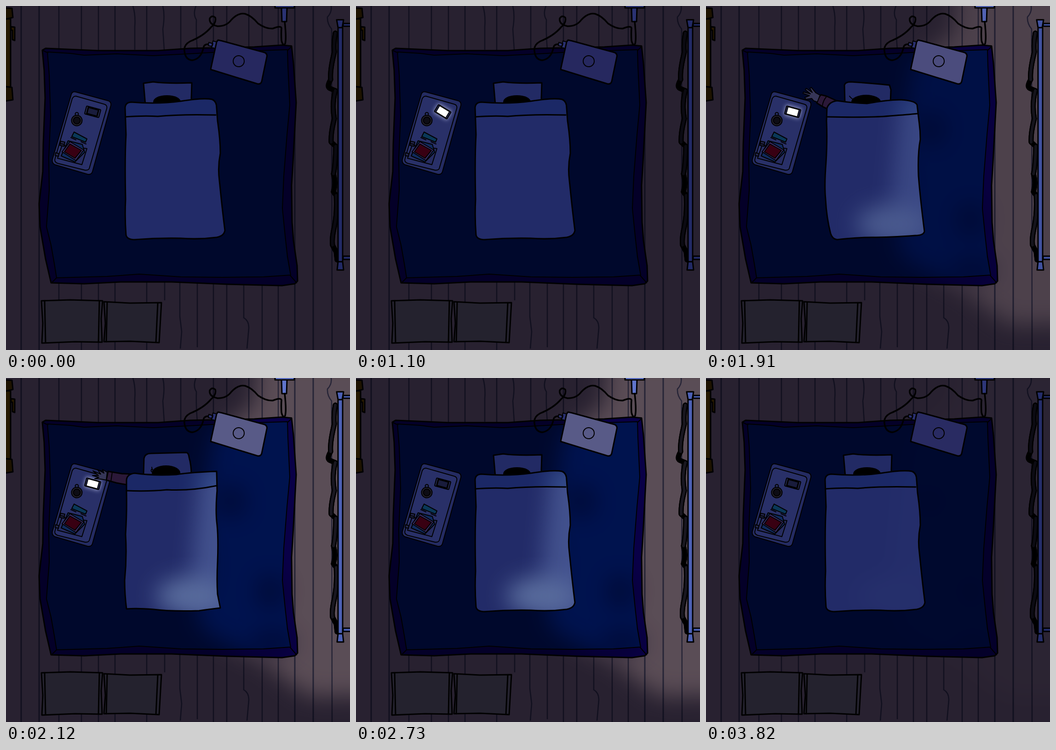
Animation of 748 by 748 pixels, one loop 3850 ms. Source, as an HTML page:

```html
<!DOCTYPE html>
<html>
<head>
<meta charset="utf-8">
<style>
html, body { margin: 0; width: 100%; height: 100%; overflow: hidden; background: #282130; }
svg { display: block; width: 100vw; height: 100vh; isolation: isolate; }
.ink { stroke: #000; stroke-width: 3; stroke-linejoin: round; stroke-linecap: round; }
.thin { stroke-width: 2; }
.line { fill: none; }
.light { mix-blend-mode: color-dodge; }
</style>
</head>
<body>
<svg viewBox="0 0 748 748">
  <defs>
    <filter id="soft" x="-50%" y="-50%" width="200%" height="200%"><feGaussianBlur stdDeviation="24"/></filter>
    <filter id="halo" x="-50%" y="-50%" width="200%" height="200%"><feGaussianBlur stdDeviation="4"/></filter>
    <clipPath id="bedClip"><path class="cover"/></clipPath>
  </defs>

  <rect width="748" height="748" fill="#282130"/>
  <g id="planks" class="line" stroke="#11101f" stroke-width="2.5">
    <path d="M276 0Q282 20 280 45V95M341 0Q346 20 341 50L344 95M413 0Q406 18 414 30Q413 60 416 95"/>
    <path d="M378 600V675L382 708L379 745M517 603V678Q528 684 528 700L524 745"/>
    <path d="M707 0Q709 14 699 24Q698 38 708 50L709 748"/>
  </g>

  <!-- cabinet -->
  <g class="ink" fill="#261900">
    <path d="M-3 28H10V176H-3z"/>
    <path d="M-3 4L13 5L15 25L-3 29zM-3 175L13 177L15 204L-3 207z" fill="#1d1300"/>
    <path d="M11 45L19 46V75L14 73V53L11 52z"/>
  </g>

  <!-- boxes -->
  <g class="ink" fill="#24222e" stroke-width="2.5">
    <path d="M77 641L140 639L210 641L207 680L209 731L150 730L78 733L80 690zM213 643L270 646L338 645L333 732L270 729L213 730L216 690z"/>
    <path class="line" d="M84 641L86 732M203 641L201 731M220 644L218 730M330 646L326 731"/>
  </g>

  <!-- rug -->
  <g class="ink" stroke-width="2.5">
    <path fill="#040028" d="M79 96L86 92L200 97L330 97L400 92L540 89L600 85L621 87L625 125L631 210L624 340L621 390L622 470L625 510L633 565L634 598L628 604L600 608L480 605L360 600L250 600L170 604L98 602L86 550L74 480L72 430L80 360L81 300L85 200L83 140z"/>
    <path class="thin" fill="#00082c" d="M90 100L140 103L170 107L240 104L320 108L415 103L480 99L612 95L613 130L617 215L611 280L604 370L601 440L607 500L612 545L619 585L560 589L470 590L380 589L290 583L220 588L110 591L105 560L98 520L88 480L94 400L93 330L97 240L94 150z"/>
    <path class="line thin" d="M81 97L91 102M613 96L621 88M618 586L632 602M110 591L99 602"/>
  </g>

  <!-- curtain and rail -->
  <g class="line" stroke-linejoin="round" stroke-linecap="round">
    <path id="drape" stroke="#000" stroke-width="11" d="M716 59Q712 80 714 100Q704 140 706 160Q697 175 704 179L716 184Q708 215 714 245Q706 275 707 296L717 305Q716 350 712 365Q718 385 712 404L718 412Q720 450 714 480Q708 505 710 520L718 535L720 552"/>
    <use href="#drape" style="stroke-width:6"/>
    <path stroke="#0b0a12" stroke-width="6" d="M716 59Q712 80 714 100Q704 140 706 160M716 184Q708 215 714 245Q706 275 707 296M717 305Q716 350 712 365M718 412Q720 450 714 480Q708 505 710 520"/>
  </g>
  <g class="ink" fill="#222a66">
    <path d="M733 38H752V44H733zM733 544H752V551H733zM722 47H732V556H722zM719 30H734L731 47H722zM722 556H732L734 574H720z"/>
  </g>

  <!-- adapter -->
  <g class="ink" stroke-width="2.5" fill="#2a3272"><path d="M585 -2H627V4H585zM599 4H611L610 34H600z"/></g>

  <g class="light">
    <path filter="url(#soft)" fill="#8e9170" d="M550 -50L820 -50V690L660 692Q610 660 570 622L470 570Q380 540 440 430L425 290L450 125L540 60z"/>
    <g filter="url(#soft)" opacity=".5"><ellipse cx="488" cy="268" rx="30" ry="32"/><ellipse cx="575" cy="465" rx="26" ry="34"/><ellipse cx="580" cy="575" rx="45" ry="22"/></g>
  </g>

  <!-- laptop -->
  <g class="ink">
    <path class="line" stroke-width="3.5" d="M441 83Q430 82 429 92Q424 115 405 118Q390 117 388 98Q386 85 400 77Q430 65 446 46Q458 36 455 25Q448 19 443 27Q441 40 460 44Q480 44 490 30Q505 14 520 17Q535 22 548 38Q565 50 580 49Q598 42 599 48Q598 60 599 75Q602 88 607 82Q610 70 606 34"/>
    <path class="thin" fill="#2a3070" d="M441 79L450 82L448 88L440 86zM450 76L461 79L457 93L447 90z"/>
    <path id="lid" fill="#26285f" d="M461 74L470 76L562 101Q569 104 567 111L556 164Q554 171 546 169L445 138L458 78z"/>
    <circle class="thin" cx="506" cy="120" r="12" fill="#26285f"/>
  </g>

  <!-- side table -->
  <g class="ink thin">
    <path fill="#242b62" d="M142 192Q144 185 152 187L222 206Q229 208 228 216L188 360Q186 367 178 366L106 345Q99 341 101 333z"/>
    <path fill="#293068" d="M152 196L212 213Q221 215 219 223L182 350Q181 358 172 357L112 342Q104 339 107 331L143 205Q145 196 152 196z"/>
    <circle cx="154" cy="235" r="3.5" fill="#293068"/>
    <circle cx="154" cy="249" r="11.5" fill="#24222e"/>
    <circle cx="154" cy="249" r="7.5" fill="#0d0c14"/>
    <path fill="#0a3858" d="M148 274L176 289L173 296L143 284z"/>
    <path class="line" d="M141 286L152 291M163 295L174 300"/>
    <path fill="#262c60" d="M122 303L176 310L165 345L112 331z"/>
    <path fill="#102a5c" d="M135 293L166 301L171 318L150 339L120 326z"/>
    <path fill="#3a2d66" d="M139 295L169 313L152 336L122 317z"/>
    <path fill="#380012" d="M139 300L164 314L150 331L127 317z"/>
    <path fill="#24264c" d="M119 294L128 296L126 305L117 303zM108 319L115 321L114 327L107 325z"/>
    <path class="line" d="M117 299L127 301"/>
  </g>
  <g id="phone">
    <rect id="glow" x="-18" y="-12" width="36" height="24" rx="4" fill="#b9bfe8" filter="url(#halo)"/>
    <rect class="ink thin" x="-16" y="-9" width="32" height="18" rx="2" fill="#24284e"/>
    <rect class="ink" stroke-width="1" x="-11.5" y="-7" width="23" height="14" fill="#191c3c"/>
    <rect id="screen" x="-11.5" y="-7" width="23" height="14" fill="#fff"/>
  </g>

  <!-- bed -->
  <path id="pillow" class="ink" fill="#222a64"/>
  <path id="mark" class="ink thin line"/>
  <ellipse id="head"/>
  <g id="arm" class="ink" stroke-width="2.5">
    <path id="sleeve" fill="#2b1838"/>
    <path id="cuff" class="line thin"/>
    <path id="hand" class="thin" fill="#363658"/>
  </g>
  <path class="cover" fill="#222b68"/>
  <path id="band" clip-path="url(#bedClip)" fill="#1b2866"/>
  <path id="fold" class="ink line"/>
  <path class="cover ink line" stroke-width="3.5"/>

  <g class="light">
    <path fill="#959150" d="M461 74L470 76L562 101Q569 104 567 111L556 164Q554 171 546 169L445 138L458 78z" opacity=".95"/>
    <g clip-path="url(#bedClip)">
      <path filter="url(#soft)" fill="#8a8650" opacity=".8" d="M425 190H520V530H400L405 400z"/>
      <ellipse filter="url(#soft)" fill="#9c9855" cx="405" cy="474" rx="78" ry="42"/>
    </g>
  </g>
</svg>
<script>
const $ = id => document.getElementById(id);
const all = s => document.querySelectorAll(s);

const plank = x => `M${x} 0V748`;
$('planks').insertAdjacentHTML('afterbegin',
  `<path d="${[33, 72, 628, 668].map(plank).join('')}" stroke-width="3"/>` +
  `<path d="${[115, 164, 201, 237, 306, 451, 480, 557, 592].map(plank).join('')}M528 0V95M380 0V95M416 600V742M345 600V640"/>`);

const rest = {
  pillow: 'M299 168L320 165Q350 169 404 167L403 200L405 215H303z',
  head: [350, 208, 30, 14],
  cover: 'M259 222Q259 210 272 209Q330 214 380 207Q430 199 448 203Q458 207 458 222L460 250Q466 290 466 320Q460 350 464 380Q470 440 476 488Q474 500 458 503Q420 508 380 505Q330 504 280 508Q263 508 261 498Q258 460 260 420Q258 330 261 280z',
  fold: 'M260 241Q300 238 330 240Q380 235 456 237'
};
const reach = {
  pillow: 'M301 172Q303 165 315 165Q360 168 399 172L402 182L401 212H302z',
  mark: 'M312 196Q318 204 324 203',
  head: [348, 208, 32, 15],
  cover: 'M263 222Q268 208 285 206Q320 211 350 212Q400 203 425 204Q455 206 459 215L463 250Q466 270 466 290Q460 320 462 370Q466 420 475 490Q473 499 455 499Q400 503 360 503Q330 503 285 508Q275 507 271 495Q262 460 260 420Q257 390 261 340Q264 290 262 250z',
  fold: 'M263 241Q360 243 400 239Q440 236 460 234',
  sleeve: 'M237 205Q240 192 246 187L258 190L300 209L290 232L250 213z',
  cuff: 'M258 191Q250 200 249 212',
  hand: 'M244 188L235 183L225 171L222 173L227 182L214 173L212 176L223 185L208 181L207 184L221 189L211 193L213 197L226 195L230 200L238 203z'
};
const press = {
  pillow: 'M300 175Q302 164 315 164L392 162Q397 163 398 172Q403 190 403 210H299z',
  mark: 'M317 194Q318 202 323 203M317 198Q314 202 317 204',
  head: [348, 206, 31, 16],
  cover: 'M262 222Q263 209 280 207Q320 213 370 210Q400 205 458 203L459 245Q455 290 459 320Q462 350 460 400Q458 440 460 470L466 500Q440 503 420 506Q360 508 320 503Q285 500 262 502Q258 470 258 440Q263 390 260 340Q263 290 262 250z',
  fold: 'M262 245Q310 247 350 243Q400 246 459 234',
  sleeve: 'M222 203L252 208L340 212V240L262 232L240 228L218 222z',
  cuff: 'M231 205L228 225',
  hand: 'M220 205L210 199L213 207L199 199L206 209L189 202L201 212L188 212L202 216L193 219L207 220L218 222z'
};
const retreat = {
  pillow: 'M299 172Q300 165 312 165L390 163Q397 165 397 178L400 208H298z',
  mark: 'M318 192Q318 200 322 202',
  head: [346, 203, 30, 15],
  cover: 'M263 225Q265 210 280 209Q320 210 350 206Q400 208 455 202L458 245Q452 270 457 300Q463 340 462 400L460 460L462 505Q430 511 370 513Q320 514 290 507L259 495Q255 470 257 440Q263 360 263 300z',
  fold: 'M265 246Q320 245 370 251Q390 254 459 244',
  sleeve: 'M241 213L285 208V238L246 238z',
  cuff: 'M252 212L257 238',
  hand: 'M243 213L234 214L230 221L220 223L221 227L230 228L226 233L235 233L245 237z'
};

// start time, pose, arm offset
const poses = [
  [0, rest], [1520, reach, 90, 30], [1580, reach, 32, 14], [1640, reach],
  [1910, reach, 4, 6], [1970, press, 14], [2060, press],
  [2190, press, -16], [2240, press, -32], [2300, press, -42], [2350, press, -49],
  [2440, press, -20], [2470, retreat], [2600, reach, 90, 30], [2730, rest]
];

const tick = (t, start) => Math.floor((t - start) / 30) + 1;

function daylight(t) {
  if (t < 1370) return 0;
  return t < 3430 ? Math.min(1, tick(t, 1370) / 26) : Math.max(0, 1 - tick(t, 3430) / 15);
}

function tilt(t) {
  for (const start of [420, 960]) {
    const k = Math.floor((t - start) / 70);
    if (k >= 0 && k < 3) return k % 2 ? -8 : 16;
  }
  return 0;
}

let shown;
function setPose(entry) {
  if (entry === shown) return;
  shown = entry;
  const [, p, dx = 0, dy = 0] = entry;
  for (const id of ['pillow', 'mark', 'fold', 'sleeve', 'cuff', 'hand']) $(id).setAttribute('d', p[id] || '');
  for (const el of all('.cover')) el.setAttribute('d', p.cover);
  $('band').setAttribute('d', p.fold + 'L490 237V180H240V243z');
  ['cx', 'cy', 'rx', 'ry'].forEach((a, i) => $('head').setAttribute(a, p.head[i]));
  $('arm').setAttribute('transform', `translate(${dx} ${dy})`);
}

function draw(now) {
  const t = now % 3850;
  setPose(poses.filter(p => p[0] <= t).pop());
  for (const el of all('.light')) el.style.opacity = daylight(t);
  const lit = t < 160 || t >= 2440 ? 0 : Math.min(1, tick(t, 160) / 3);
  $('screen').style.opacity = lit;
  $('glow').style.opacity = t < 420 ? lit * .3 : lit * .65;
  $('phone').setAttribute('transform', `translate(188.5 230) rotate(${15 + tilt(t)})`);
}

const begin = performance.now();
function loop() {
  draw(performance.now() - begin);
  requestAnimationFrame(loop);
}
loop();
</script>
</body>
</html>
```
